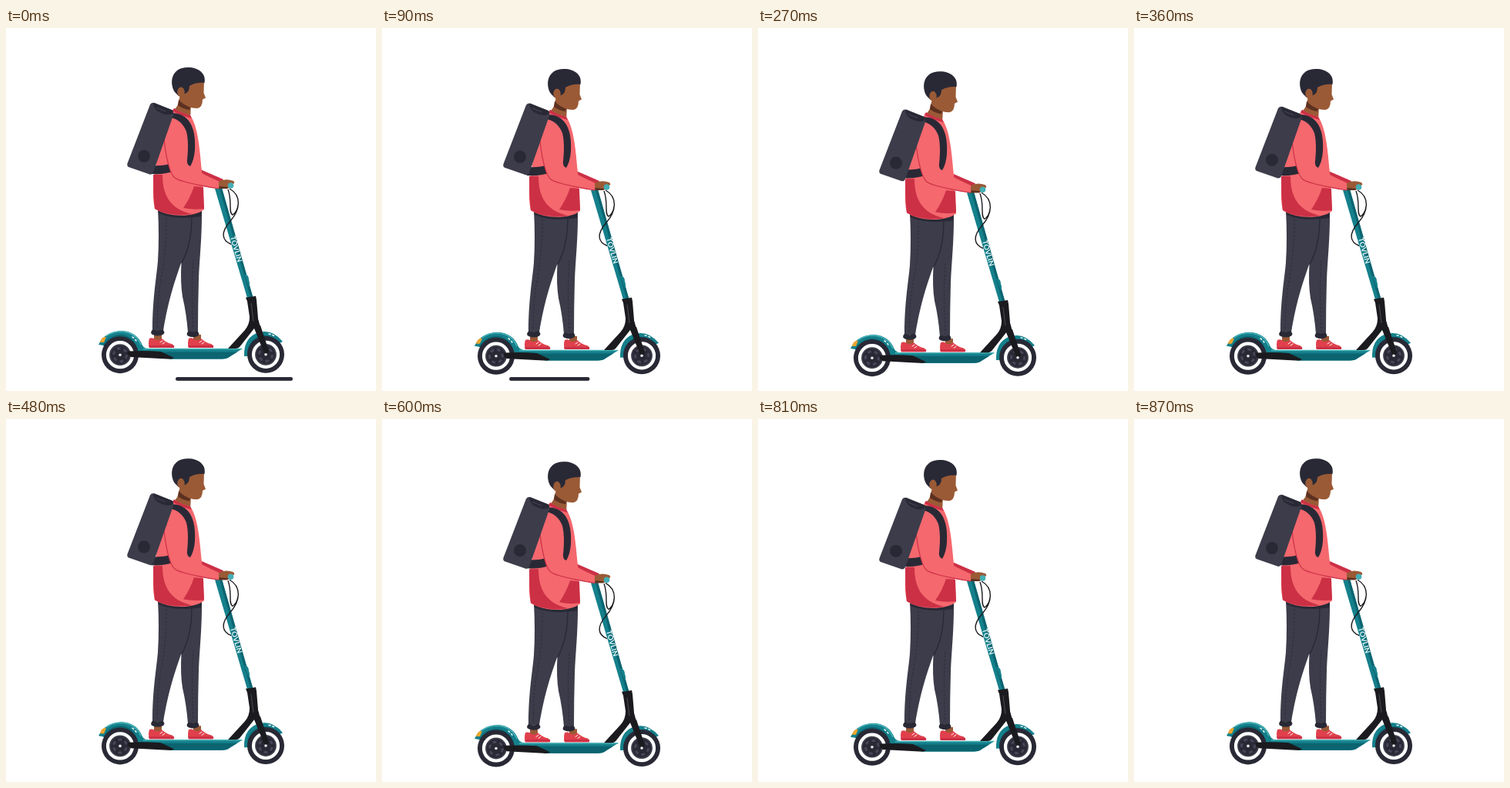
An HTML page for the animation above (900 ms loop, 480 px wide and 470 px high).

```html
<!DOCTYPE html>
<html lang="en">
<head>
<meta charset="utf-8">
<title>Scooter ride</title>
<style>
  html, body { margin: 0; width: 100%; height: 100%; overflow: hidden; background: #fff; }
  svg { display: block; width: 480px; height: 470px; }
  .ink { fill: #292936; }
  .cloth { fill: #3d3c4a; }
  .skin { fill: #9a5a36; }
  .shade { fill: #5c3020; }
  .coral { fill: #f4686e; }
  .red { fill: #cc3045; }
  .teal { fill: #14808b; }
  .deep { fill: #0b6470; }
  .black { fill: #1b1b1f; }
  .line { fill: none; stroke: #292936; stroke-linecap: round; }
  .glint { fill: none; stroke: #fff; stroke-linecap: round; }
  .shine { fill: none; stroke: #48b3b8; stroke-width: 1.5; }
  .brand { font: bold 9.5px Lato, Arial, sans-serif; fill: #e4f5f5; }
</style>
</head>
<body>
<svg viewBox="0 0 480 470">
  <defs>
    <g id="wheel">
      <circle r="24" class="ink"/>
      <circle r="16" fill="#3d3c4a" stroke="#fff" stroke-width="4.2"/>
      <circle r="12" class="ink"/>
      <circle r="8.5" class="spin" fill="none" stroke="#474658" stroke-width="3" stroke-dasharray="4.9 4"/>
    </g>
    <g id="shoe">
      <path class="skin" d="M7-17H17V-9H7Z"/>
      <path fill="#e0404c" d="M1-12Q5-14 8-11Q13-8 17-12Q24-6 30-5Q33-4 33 0H1Q-1-6 1-12Z"/>
      <path class="red" d="M0-3H33Q34 0 31 0H1Z"/>
      <path class="glint" d="M15-7L18-9M18-5L21-7" stroke-width="1"/>
    </g>
  </defs>

  <path id="ground" class="line" stroke-width="4.6"/>

  <g id="frame">
    <path class="teal" d="M120 410Q128 393 150 392Q170 393 177 411Q179 415 187 416L181 422L150 424L126 411Z"/>
    <path class="deep" d="M126 411Q134 397 149 397Q163 398 169 411L172 421L150 424Z"/>
    <path fill="#eea52f" d="M122 407Q124 399 130 400L127 407Z"/>
    <path class="shine" d="M130 399Q138 393 150 393Q168 394 175 410"/>
    <path class="glint" d="M164 400Q168 403 170 407" stroke-width="1.4" stroke-dasharray="2 3"/>
    <path class="teal" d="M309 425Q308 404 323 396Q343 387 359 406L355 408L337 424Z"/>
    <path class="deep" d="M313 425Q312 408 326 400Q340 394 353 405L337 424Z"/>
    <path class="glint" d="M341 396Q346 397 350 400" stroke-width="1.4" stroke-dasharray="2 3"/>
  </g>

  <g id="wheels">
    <use href="#wheel" x="148" y="423.2"/>
    <use href="#wheel" x="337" y="422.8"/>
  </g>

  <g id="rider">
    <!-- deck, fork and stem -->
    <path class="teal" d="M178 415H307L291 425Q287 428.5 280 428.5H212L186 421Z"/>
    <path class="deep" d="M190 419.5H300L291 425Q287 428.5 280 428.5H212Z"/>
    <path class="shine" d="M178 415.6H306"/>
    <path class="black" d="M158 418.5Q182 417.5 201 419L218 427Q216 429 209 428.5L162 426Q156 422 158 418.5Z"/>
    <path class="teal" d="M271 208L280 207L321 351L314 353Z"/>
    <path class="deep" d="M277 208L280 207L321 351L318 352Z"/>
    <path class="teal" d="M309 319Q315 319 315 326Q317 331 315 335Z"/>
    <text class="brand" transform="translate(290.8 270.5) rotate(74)">TOVLIN</text>
    <path class="black" d="M311 349L324 347L325 352L327 376L341 418Q340 423 335 421L322 389L303 413Q301 415 298 415H288L310 391Q316 384 316 374L313 354Z"/>
    <path class="glint" d="M328 376L330 384M303 397L307 392" stroke-width="1.8"/>
    <path d="M318 356L321 380" stroke="#444449" stroke-width="1.2"/>

    <!-- legs -->
    <use href="#shoe" x="185" y="414"/>
    <use href="#shoe" x="236" y="414"/>
    <path class="cloth" d="M197 234H254C254.500 270 251 298 250 325Q249 360 249 394H236Q234 369 229 348Q226 330 227.500 303C219 328 211 350 204 392H190C190 350 195 325 197 302Q199 270 197 234Z"/>
    <path class="ink" d="M197 236L254 238L253 244Q220 249 198 240Z"/>
    <path class="line" d="M241 244Q241 280 228 304" stroke-width="1.3"/>
    <path class="line" d="M208 246Q209 285 201 325Q196 355 196 388M243 300Q240 330 243 390" stroke-width=".8" stroke-dasharray="2 3"/>
    <path class="line" d="M191.500 394Q197 396.500 202 394M238 396Q243 398 247 396" stroke-width="6.5"/>

    <!-- neck and head -->
    <path class="skin" d="M225 90L240 100L239 118H222L218 106Q224 101 225 90Z"/>
    <path class="shade" d="M224 93L239 102L238 106Q230 105 223 100Z"/>
    <path class="skin" d="M232 68H257L256.500 84L259 90.500L255 92.500Q255 103 248 104Q236 104 226 95L224 80Z"/>
    <path class="ink" d="M219 83C212 73 213 51 236 51C250 51 260 59 257.500 71Q247 70 238 75Q238 83 232 85L224 88Z"/>
    <ellipse class="skin" cx="227" cy="83" rx="4.7" ry="6.5"/>

    <!-- jumper -->
    <path class="red" d="M252 183L282 196L277 205L250 198Z"/>
    <path class="coral" d="M218 104Q226 110 239 113C249 128 251 153 254 185L257 235C243 246 209 245 193 234C189 216 191 193 196 170L205 125Z"/>
    <path class="red" d="M191 190H203C203 218 214 235 242 241Q211 245 193 234Q191 216 191 190ZM230 233Q239 220 244 205L256 206L257 234Q243 236 230 233Z"/>
    <path class="red" d="M218 104Q227 110 239 113L241 117Q225 113 216 107Z"/>
    <path class="ink" d="M214 110C237 110 247 128 245 158Q244 171 239 179H234Q238 150 234 134Q228 119 214 116Z"/>
    <path class="ink" d="M188 178Q205 179 214 175L219 185Q206 190 188 189Z"/>
    <path class="coral" d="M207 120C220 124 229 154 236 177Q248 186 277 199L276 208Q245 204 226 199Q215 196 212 181Q202 145 207 120Z"/>
    <path d="M205 145Q210 186 219 194Q227 200 276 208" fill="none" stroke="#cc3045" stroke-width="1.2"/>

    <!-- cables, grip and hand -->
    <path d="M290 208C306 217 304 235 291 250S280 275 292 280M288 209C294 225 288 239 294 242Q300 238 301 229" fill="none" stroke="#1b1b1f" stroke-width="1.4"/>
    <path class="skin" d="M276 199Q284 194 295 198Q298 201 294 202L288 208L276 208Z"/>
    <path class="shade" d="M277 205L288 206L287 208H276Z"/>
    <circle cx="291.5" cy="204" r="3.8" fill="#43aeb5"/>
  </g>

  <g id="hubs" fill="#e8e8ee">
    <circle cx="148" cy="423.2" r="1.8"/>
    <circle cx="337" cy="422.8" r="1.8"/>
  </g>

  <g id="bag">
    <path class="cloth" d="M187 99Q189 96 193 97L215 106Q218 107 217 113L191 187Q189 191 185 189L159 180Q156 178 158 174Z"/>
    <path class="ink" d="M191 97L215 106Q218 107 216 111Q209 114 201 110Q192 107 191 97Z"/>
    <path d="M195 103L207 108" stroke="#474658"/>
    <circle class="ink" cx="179" cy="166" r="8"/>
  </g>
</svg>
<script>
  const LOOP = 900, BOUNCE = 450, STEP = 30;
  const $ = id => document.getElementById(id);
  const spinners = document.querySelectorAll('.spin');
  const bob = (t, depth, lag = 0) =>
    depth / 2 * (1 - Math.cos((t - lag) / BOUNCE * 2 * Math.PI));
  const shift = (id, y) => $(id).setAttribute('transform', `translate(0 ${y.toFixed(2)})`);

  function draw(now) {
    const t = Math.floor(now % LOOP / STEP) * STEP;
    shift('wheels', bob(t, 4.4));
    shift('hubs', bob(t, 4.4));
    shift('frame', bob(t, 5.4));
    shift('rider', bob(t, 5.8));
    shift('bag', bob(t, 9.2, 35) - 0.5);
    spinners.forEach(s => s.setAttribute('transform', `rotate(${t / LOOP * 360})`));

    // The ground streak shrinks as it runs off to the left.
    const left = Math.max(63, 220 - 0.61 * t) + 2.3;
    const right = 372 - 1.14 * t - 2.3;
    $('ground').setAttribute('d', right > left ? `M${left} 454.4H${right}` : '');
    requestAnimationFrame(() => draw(performance.now()));
  }
  draw(0);
</script>
</body>
</html>
```
